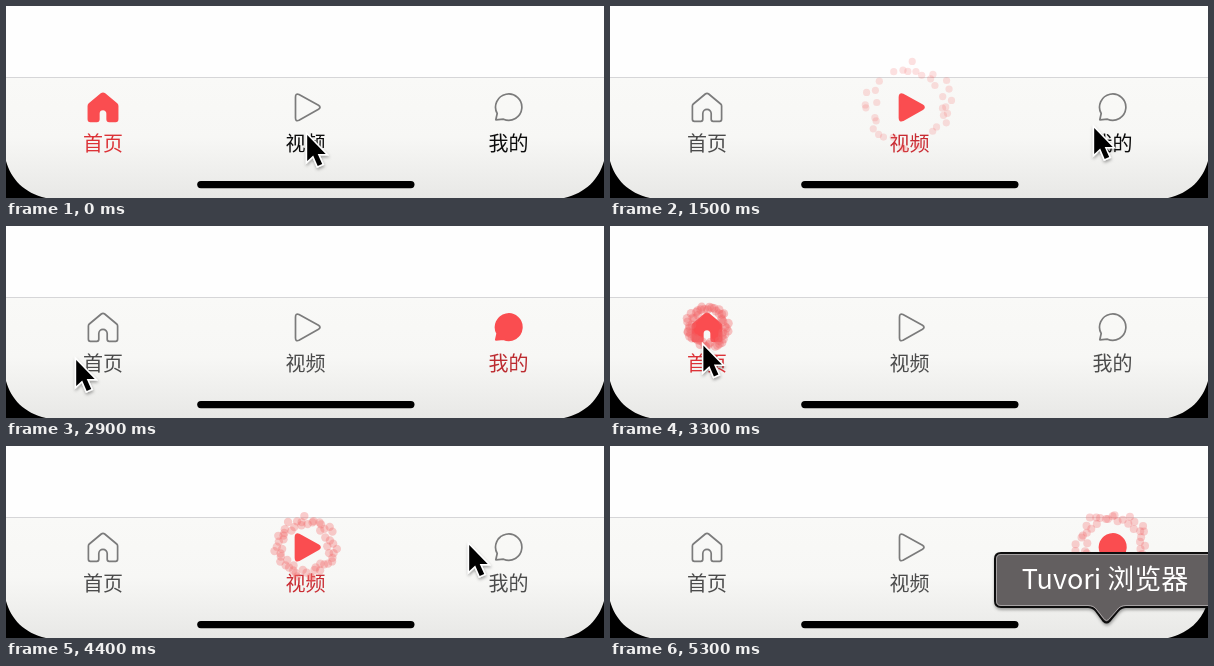
An HTML page for the animation above (5.4 s loop, 598x192 px).

```html
<!DOCTYPE html>
<html lang="zh-CN">
<head>
<meta charset="utf-8">
<title>标签栏</title>
<style>
html, body { margin: 0; width: 100%; height: 100%; overflow: hidden; background: #fff; }
svg { display: block; width: 598px; height: 192px; }
text { font-family: "Noto Sans CJK SC", "Noto Sans CJK", sans-serif; text-anchor: middle; }
.label { font-size: 20px; }
.icon { stroke-width: 1.7; stroke-linejoin: round; stroke-linecap: round; }
</style>
</head>
<body>
<svg id="stage" viewBox="0 0 598 192" xmlns="http://www.w3.org/2000/svg">
  <defs>
    <linearGradient id="bar" x1="0" y1="0" x2="0" y2="1">
      <stop offset="0" stop-color="#f9f9f7"/>
      <stop offset=".5" stop-color="#f7f7f5"/>
      <stop offset="1" stop-color="#e8e8e6"/>
    </linearGradient>
    <filter id="shade" x="-50%" y="-30%" width="220%" height="180%">
      <feDropShadow dx="0.5" dy="2" stdDeviation="1.6" flood-color="#000" flood-opacity=".35"/>
    </filter>
  </defs>
  <rect width="598" height="192" fill="#fefefe"/>
  <rect y="71" width="598" height="121" fill="url(#bar)"/>
  <rect y="71" width="598" height="1" fill="#d6d6d8"/>
  <path d="M0 155C5 173 18 187 40 192H0ZM598 155C593 173 580 187 558 192H598Z"/>
  <rect x="191.2" y="175" width="217.3" height="7.2" rx="3.6"/>
  <g id="tabs"></g>
  <g id="dots" fill="#f36668"></g>
  <path id="cursor" d="M-.8 1V27L5.2 21.5L9.700 32L14.200 30L9.700 20H17.700Z" stroke="#fff" stroke-width="3"
    paint-order="stroke" filter="url(#shade)"/>
  <g id="tip" filter="url(#shade)">
    <path d="M391 107H602Q608 107 608 113V155Q608 161 602 161H516Q511 161 508 165L499.500 175Q496.500 178 493.500 175L486 165Q483 161 478 161H391Q385 161 385 155V113Q385 107 391 107Z"
      fill="#645f60" stroke="#0e0d0d" stroke-width="2"/>
    <path d="M602 108.500H391Q386.500 108.500 386.500 113V155Q386.500 159.500 391 159.500H478Q484 159.500 487 164L494.500 173.500Q496.500 175.500 498.500 173.500L507 164Q510 159.500 516 159.500H602"
      fill="none" stroke="#a5a1a2"/>
    <text x="495" y="143" font-size="27" fill="#fff">Tuvori 浏览器</text>
  </g>
</svg>
<script>
const LOOP = 5400, RED = '#fa4d50', GREY = '#7b7b7b', COUNT = 54, BURST = 800;
const $ = id => document.getElementById(id);

function add(parent, tag, attrs) {
  const el = document.createElementNS('http://www.w3.org/2000/svg', tag);
  for (const k in attrs) el.setAttribute(k, attrs[k]);
  return parent.appendChild(el);
}

const tabs = [
  { x: 97, name: '首页', red: '#dc3237',
    d: 'M95.300 88Q97 86.600 98.700 88L110.700 98Q111.600 98.800 111.600 100V113.300Q111.600 115.300 109.600 115.300H103.200Q101.200 115.300 101.200 113.300V107.500A4.200 4.200 0 0 0 92.800 107.500V113.300Q92.800 115.300 90.800 115.300H84.400Q82.400 115.300 82.400 113.300V100Q82.400 98.800 83.300 98Z' },
  { x: 299.5, name: '视频', red: '#c92c33',
    d: 'M289.500 91Q289.500 87 293 88.500L312.500 99.300Q315.500 101.300 312.500 103.300L293 114.300Q289.500 115.800 289.500 112Z' },
  { x: 502.5, name: '我的', red: '#bc2b30',
    d: 'M489.800 113.800L491.200 107.500A13.150 13.150 0 1 1 497.500 113.200Z' }
];
for (const tab of tabs) {
  tab.icon = add($('tabs'), 'path', { class: 'icon', d: tab.d });
  tab.label = add($('tabs'), 'text', { class: 'label', x: tab.x, y: 144.5 });
  tab.label.textContent = tab.name;
}
const dots = Array.from({ length: COUNT }, () => add($('dots'), 'circle', {}));

// [time, tab]
const taps = [[900, 1], [2000, 2], [3100, 0], [4080, 1], [4900, 2]];

// [time, x, y] of the pointer
const path = [
  [0, 302, 128], [700, 304, 122], [1100, 304, 122], [1500, 485, 121], [1800, 499, 118],
  [2000, 499, 118], [2300, 114, 147], [2900, 71, 133], [3100, 92, 120], [3400, 95, 118],
  [3700, 314, 94], [4000, 306, 104], [4100, 306, 104], [4400, 464, 98], [4800, 497, 114],
  [4950, 498, 118], [5200, 498, 188], [5300, 498, 230]
];

function pointer(t) {
  let i = 0;
  while (i < path.length - 2 && t > path[i + 1][0]) i++;
  const [t0, x0, y0] = path[i], [t1, x1, y1] = path[i + 1];
  const u = Math.min(1, (t - t0) / (t1 - t0)), e = u * u * (3 - 2 * u);
  return [x0 + (x1 - x0) * e, y0 + (y1 - y0) * e];
}

function random(seed) {
  return () => {
    seed = (seed * 1664525 + 1013904223) >>> 0;
    return seed / 4294967296;
  };
}

function drawBurst(x, u, seed) {
  const rnd = random(seed * 7919 + 17);
  const reach = 43 * (1 - (1 - u) ** 2);
  dots.forEach((dot, i) => {
    const angle = (i + rnd()) / COUNT * Math.PI * 2;
    const r = reach * (0.78 + 0.38 * rnd());
    const alive = u >= 0 && u < 0.55 + 0.5 * rnd() && u < 1;
    dot.setAttribute('cx', (x + r * Math.cos(angle)).toFixed(2));
    dot.setAttribute('cy', (101 + r * Math.sin(angle)).toFixed(2));
    dot.setAttribute('r', Math.max(0, 4.8 - 1.6 * u));
    dot.setAttribute('opacity', alive ? 0.45 * (1 - u) ** 0.6 : 0);
  });
}

function render(t) {
  const done = taps.filter(tap => t >= tap[0]);
  const last = done.length ? done[done.length - 1] : [-BURST, 0];
  const seen = new Set([0, ...done.map(tap => tap[1])]);

  tabs.forEach((tab, i) => {
    const on = i === last[1];
    tab.icon.setAttribute('fill', on ? RED : 'none');
    tab.icon.setAttribute('stroke', on ? RED : GREY);
    tab.label.setAttribute('fill', on ? tab.red : seen.has(i) ? '#4b4b4b' : '#0c0c0c');
  });
  drawBurst(tabs[last[1]].x, (t - last[0]) / BURST, done.length);

  $('cursor').setAttribute('transform', `translate(${pointer(t).map(v => v.toFixed(1))})`);
  $('tip').style.display = t >= 5300 ? '' : 'none';
}

// The picture advances in 100 ms steps, with two longer holds.
function step(t) {
  const q = Math.floor(t / 100) * 100;
  return q === 100 ? 0 : q === 800 ? 700 : q;
}

let start = null, shown = 0;
render(0);
function tick(now) {
  if (start === null) start = now;
  const q = step((now - start) % LOOP);
  if (q !== shown) render(shown = q);
  requestAnimationFrame(tick);
}
requestAnimationFrame(tick);
</script>
</body>
</html>
```
